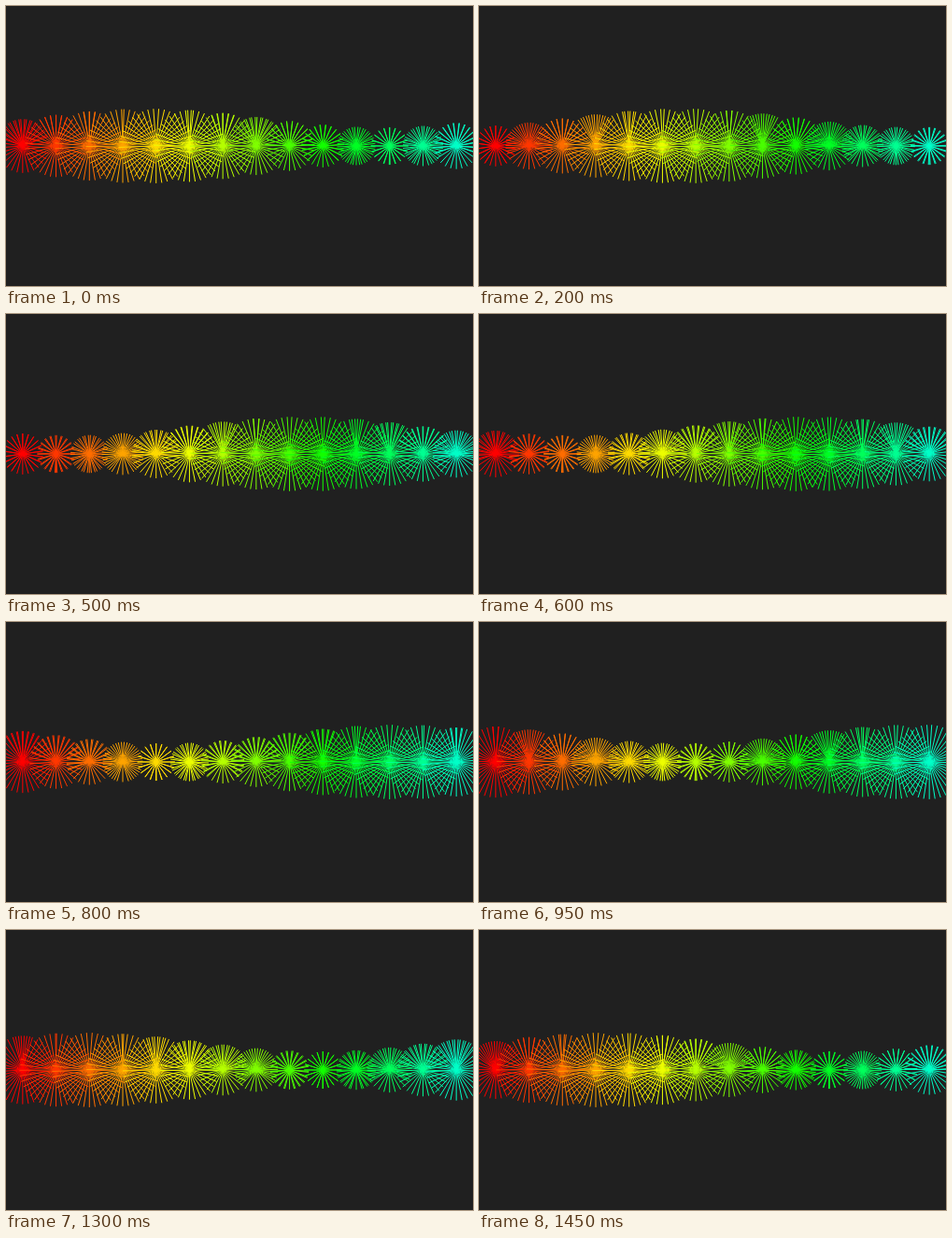
These frames come from a looping animation (500 px wide and 300 px high, 1500 ms). An HTML page with a canvas:

```html
<!DOCTYPE html>
<html lang="en">
<head>
<meta charset="utf-8">
<title>Rainbow star wave</title>
<style>
  html, body { margin: 0; width: 100%; height: 100%; overflow: hidden; background: #202020; }
  canvas { display: block; }
</style>
</head>
<body>
<canvas id="stage" width="500" height="300"></canvas>
<script>
const ctx = document.getElementById('stage').getContext('2d');
const TAU = Math.PI * 2;
const LOOP = 1500, STEP = 50;
const STARS = 14, ARMS = 20, CREST = 3.75;

// Spokes fan out both ways from straight down and overlap at the top.
function drawStar(x, y, radius, spacing, color) {
  ctx.strokeStyle = color;
  for (let k = -ARMS; k <= ARMS; k++) {
    const angle = k * spacing;
    ctx.beginPath();
    ctx.moveTo(x, y);
    ctx.lineTo(x + radius * Math.sin(angle), y + radius * Math.cos(angle));
    ctx.stroke();
  }
}

function draw(now) {
  const phase = Math.floor((now % LOOP) / STEP) * STEP / LOOP;
  ctx.fillStyle = '#202020';
  ctx.fillRect(0, 0, 500, 300);
  ctx.lineWidth = 1;
  for (let i = 0; i < STARS; i++) {
    const swell = 0.5 + 0.5 * Math.cos(TAU * ((i - CREST) / STARS - phase));
    const x = (i + 0.5) * 500 / STARS;
    drawStar(x, 150, 20 + 20 * swell, TAU / (20 + 21 * swell), `hsl(${i * 180 / STARS}, 100%, 50%)`);
  }
}

const start = performance.now();
function tick() {
  draw(performance.now() - start);
  requestAnimationFrame(tick);
}
tick();
</script>
</body>
</html>
```
